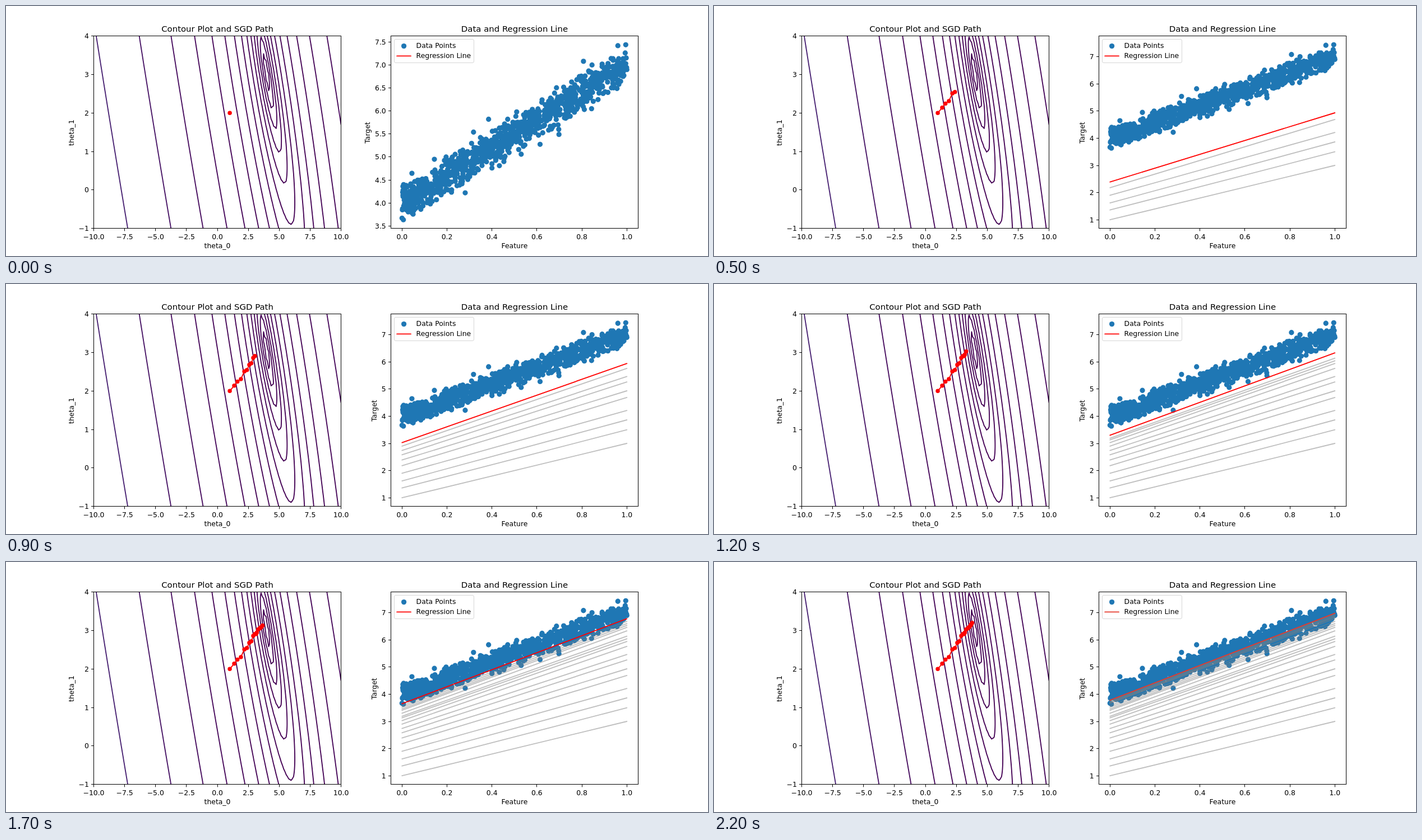
Animation, 1252 px wide and 447 px high, one loop 2300 ms. Source, as an HTML page:

```html
<!DOCTYPE html>
<html lang="en">
<head>
<meta charset="utf-8">
<title>SGD path and regression line</title>
<style>
  html, body { margin: 0; width: 100%; height: 100%; overflow: hidden; background: #fff; }
  svg { display: block; }
  text { font: 12.42px "DejaVu Sans", sans-serif; }
  .title { font-size: 14.9px; }
  .mid { text-anchor: middle; }
  .end { text-anchor: end; }
  .frame { fill: none; stroke: #000; stroke-width: 1; }
  .line { fill: none; stroke-width: 1.86; stroke-linejoin: round; stroke-linecap: round; }
  .dots { fill: none; stroke-linecap: round; }
</style>
</head>
<body>
<svg id="stage" width="1252" height="447" viewBox="0 0 1252 447"></svg>
<script>
const STEP = 100, COUNT = 23;
const TOP = 53.64, BOTTOM = 397.83, WIDTH = 441.05;
const LEFT_X = 156.5, RIGHT_X = 686.45;
const BLUE = '#1f77b4', RED = '#ff0000', DULL_RED = '#e63a2c';

// [intercept, slope] after each step
const thetas = [
  [1, 2], [1.36, 2.14], [1.62, 2.245], [1.9, 2.31], [2.18, 2.51], [2.39, 2.545],
  [2.58, 2.68], [2.74, 2.72], [2.9, 2.86], [3.03, 2.91], [3.13, 2.91], [3.19, 2.945],
  [3.3, 3.03], [3.41, 3.05], [3.46, 3.07], [3.52, 3.08], [3.58, 3.1], [3.65, 3.13],
  [3.68, 3.15], [3.7, 3.16], [3.73, 3.17], [3.76, 3.185], [3.78, 3.2]
];

const stage = document.getElementById('stage');

function add(parent, tag, attrs = {}, content) {
  const el = document.createElementNS('http://www.w3.org/2000/svg', tag);
  for (const key in attrs) el.setAttribute(key, attrs[key]);
  if (content !== undefined) el.textContent = content;
  parent.appendChild(el);
  return el;
}

const crisp = v => Math.floor(v) + 0.5;
const range = (from, to, step) =>
  Array.from({ length: Math.round((to - from) / step) + 1 }, (_, i) => from + i * step);
const label = (v, digits) => v.toFixed(digits).replace('-', '\u2212');
const dotPath = points => points.map(([x, y]) => `M${x.toFixed(2)} ${y.toFixed(2)}h0`).join('');

function xTicks(parent, values, toX) {
  for (const v of values) {
    add(parent, 'path', { class: 'frame', d: `M${crisp(toX(v))} 398v4.4` });
    add(parent, 'text', { class: 'mid', x: toX(v), y: 416.6 }, label(v, 1));
  }
}

function yTicks(parent, values, toY, axisX, digits) {
  for (const v of values) {
    add(parent, 'path', { class: 'frame', d: `M${crisp(axisX)} ${crisp(toY(v))}h-4.4` });
    add(parent, 'text', { class: 'end', x: axisX - 8.7, y: toY(v) + 4.5 }, label(v, digits));
  }
}

function yLabel(parent, x, content) {
  add(parent, 'text', { class: 'mid', transform: `translate(${x} 226.5) rotate(-90)` }, content);
}

function axes(x, title, xName) {
  add(stage, 'rect', { class: 'frame', x: crisp(x), y: 53.5, width: 441, height: 344 });
  const center = x + WIDTH / 2;
  add(stage, 'text', { class: 'title mid', x: center, y: 46.2 }, title);
  add(stage, 'text', { class: 'mid', x: center, y: 433.2 }, xName);
}

// Left panel: cost contours by marching squares on a 100 x 100 grid
const thetaX = v => LEFT_X + (v + 10) * WIDTH / 20;
const thetaY = v => BOTTOM - (v + 1) * (BOTTOM - TOP) / 5;

function cost(t0, t1) {
  const a = t0 - 3.99, b = t1 - 3.03;
  return (a * a + a * b + 0.3375 * b * b) / 2 + 0.0222;
}

function contourPath(level) {
  const n = 100;
  const gx = i => -10 + 20 * i / (n - 1), gy = j => -1 + 5 * j / (n - 1);
  let d = '';
  for (let j = 0; j < n - 1; j++) {
    for (let i = 0; i < n - 1; i++) {
      const corners = [[i, j], [i + 1, j], [i + 1, j + 1], [i, j + 1]]
        .map(([p, q]) => [gx(p), gy(q), cost(gx(p), gy(q)) - level]);
      const hits = [];
      corners.forEach((p, k) => {
        const q = corners[(k + 1) % 4];
        if (p[2] > 0 === q[2] > 0) return;
        const f = p[2] / (p[2] - q[2]);
        const x = thetaX(p[0] + f * (q[0] - p[0])), y = thetaY(p[1] + f * (q[1] - p[1]));
        hits.push(x.toFixed(2) + ' ' + y.toFixed(2));
      });
      for (let k = 0; k + 1 < hits.length; k += 2) d += `M${hits[k]}L${hits[k + 1]}`;
    }
  }
  return d;
}

function levelColor(level) {
  const t = Math.min(1, level / 111);
  return `rgb(${68 + 4 * t},${1 + 39 * t},${84 + 36 * t})`;
}

const clip = add(add(stage, 'defs'), 'clipPath', { id: 'leftArea' });
add(clip, 'rect', { x: LEFT_X, y: TOP, width: WIDTH, height: BOTTOM - TOP });
const contours = add(stage, 'g', { 'clip-path': 'url(#leftArea)' });
for (let k = 0; k < 20; k++) {
  const level = 10 ** (-2 + 5 * k / 19);
  add(contours, 'path', { class: 'line', stroke: levelColor(level), d: contourPath(level) });
}

const steps = thetas.map(([t0, t1]) => [thetaX(t0), thetaY(t1)]);
const trail = add(stage, 'path', { class: 'line', stroke: RED });
const trailDots = add(stage, 'path', { class: 'dots', stroke: RED, 'stroke-width': 7.5 });

axes(LEFT_X, 'Contour Plot and SGD Path', 'theta_0');
xTicks(stage, range(-10, 10, 2.5), thetaX);
yTicks(stage, range(-1, 4, 1), thetaY, LEFT_X, 0);
yLabel(stage, 121.3, 'theta_1');

// Right panel: noisy samples of y = 4 + 3x, with the stray points placed by hand
let seed = 20;
function random() {
  seed = (seed + 0x6D2B79F5) | 0;
  let t = Math.imul(seed ^ (seed >>> 15), 1 | seed);
  t = (t + Math.imul(t ^ (t >>> 7), 61 | t)) ^ t;
  return ((t ^ (t >>> 14)) >>> 0) / 4294967296;
}

function noise() {
  let v;
  do {
    v = 0.2 * Math.sqrt(-2 * Math.log(1 - random())) * Math.cos(2 * Math.PI * random());
  } while (Math.abs(v) > 0.4);
  return v;
}

const samples = [
  [0.385, 5.82], [0.807, 7.08], [0.281, 4.22], [0.698, 5.49], [0.697, 5.6], [0.144, 4.95],
  [0.044, 4.645], [0.006, 3.635], [0, 3.67], [0.96, 7.42], [0.995, 7.44], [0.843, 6.05],
  [0.433, 4.81], [0.453, 4.9], [0.53, 5.06], [0.614, 5.275], [0.687, 6.505], [0.47, 5.82],
  [0.51, 5.98], [0.004, 4.36], [0.22, 4.235], [0.256, 4.39], [0.046, 3.775], [0.4, 4.76],
  [0.196, 5], [0.318, 5.54], [0.845, 7], [0.89, 7.02], [1, 6.9], [0.93, 7.14]
];
while (samples.length < 1000) {
  const x = random();
  samples.push([x, Math.min(7.35, 4 + 3 * x + noise())]);
}

const featureX = v => 706.3 + 401 * v;
const targetScale = min => v => 382.18 - (v - min) / (7.44 - min) * 312.9;

function dataView(toY, ticks, digits, labelX) {
  const view = add(stage, 'g');
  add(view, 'path', {
    class: 'dots', stroke: BLUE, 'stroke-width': 9.3,
    d: dotPath(samples.map(([x, y]) => [featureX(x), toY(y)]))
  });
  yTicks(view, ticks, toY, RIGHT_X, digits);
  yLabel(view, labelX, 'Target');
  return view;
}

const wideY = targetScale(1);
const closeView = dataView(targetScale(3.635), range(3.5, 7.5, 0.5), 1, 649.3);
const wideView = dataView(wideY, range(1, 7, 1), 0, 660.8);

const fits = thetas.map(([t0, t1]) => add(wideView, 'path', {
  class: 'line',
  d: `M${featureX(0)} ${wideY(t0)}L${featureX(1)} ${wideY(t0 + t1)}`
}));

axes(RIGHT_X, 'Data and Regression Line', 'Feature');
xTicks(stage, range(0, 1, 0.2), featureX);

add(stage, 'rect', {
  x: 692.5, y: 59.5, width: 142, height: 42, rx: 2.5,
  fill: '#fff', 'fill-opacity': 0.8, stroke: '#ccc', 'stroke-opacity': 0.8
});
add(stage, 'circle', { cx: 709.6, cy: 71.6, r: 4.65, fill: BLUE });
const legendLine = add(stage, 'path', { class: 'line', d: 'M697.2 89.4h24.8' });
add(stage, 'text', { x: 731.6, y: 75.4 }, 'Data Points');
add(stage, 'text', { x: 731.6, y: 93.4 }, 'Regression Line');

function show(index) {
  const seen = steps.slice(0, index + 1);
  const red = index === COUNT - 1 ? DULL_RED : RED;
  trail.setAttribute('d', 'M' + seen.join('L'));
  trailDots.setAttribute('d', dotPath(seen));
  closeView.style.display = index === 0 ? '' : 'none';
  wideView.style.display = index === 0 ? 'none' : '';
  legendLine.setAttribute('stroke', red);
  fits.forEach((fit, k) => {
    fit.style.display = k <= index ? '' : 'none';
    fit.setAttribute('stroke', k === index ? red : '#808080');
    fit.setAttribute('stroke-opacity', k === index ? 1 : 0.5);
  });
}

const start = performance.now();
let current = -1;
function tick() {
  const index = Math.floor(Math.max(0, performance.now() - start) / STEP) % COUNT;
  if (index !== current) show(current = index);
  requestAnimationFrame(tick);
}
tick();
</script>
</body>
</html>
```
